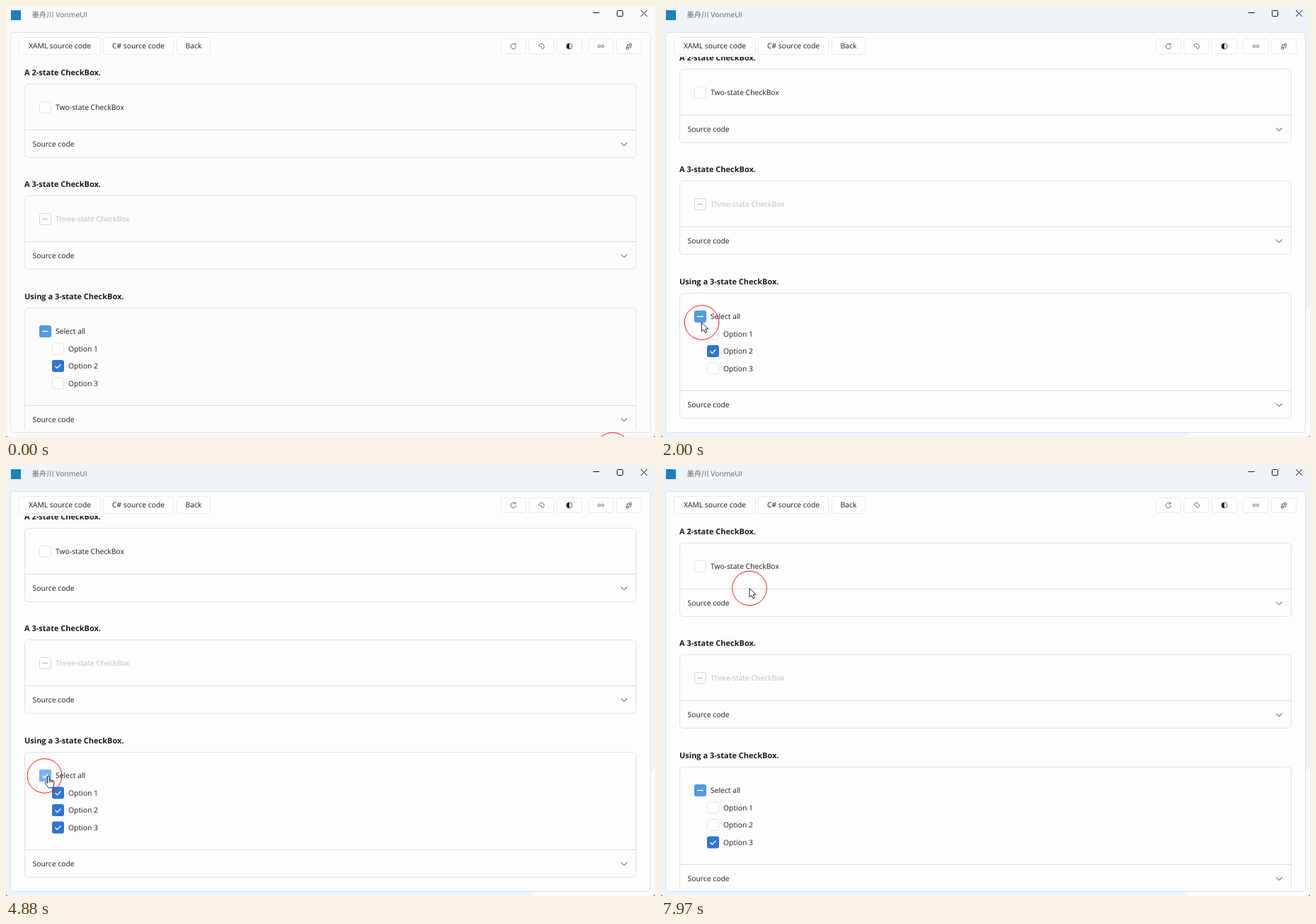
Write an HTML page that moves like this. It is 917 by 610 pixels and loops after 8000 ms.

```html
<!DOCTYPE html>
<html lang="zh">
<head>
<meta charset="utf-8">
<style>
html, body { margin: 0; width: 100%; height: 100%; overflow: hidden; background: #777; }
svg { display: block; }
text { font: 10.35px 'Open Sans', 'Noto Sans CJK SC', sans-serif; fill: #1c1c1c; text-rendering: geometricPrecision; }
.head { font-size: 11px; font-weight: 700; }
.line { fill: none; stroke: #333; }
.edge { stroke: #e1e1e1; }
.button { fill: #fefefe; stroke: #eaeaea; }
.icon .line { stroke: #555; stroke-width: .9; }
.mark { fill: none; stroke: #fff; stroke-width: 1.4; }
</style>
</head>
<body>
<svg id="stage" width="917" height="610" viewBox="0 0 917 610"></svg>
<script>
const LOOP = 8000, SCROLL = 21, HAND_SHIFT = 5;
const stage = document.getElementById('stage');
const boxes = {};

const text = (x, y, s, attrs = '') => `<text x="${x}" y="${y}" ${attrs}>${s}</text>`;
const rect = (x, y, w, h, r, attrs) =>
  `<rect x="${x}" y="${y}" width="${w}" height="${h}" rx="${r}" ${attrs}/>`;
const line = (d, attrs = '') => `<path class="line" d="${d}" ${attrs}/>`;

const button = (x, w, label) =>
  rect(x + .5, 44.5, w, 24, 3, 'class="button"') +
  text(x + .5 + w / 2, 60, label, 'text-anchor="middle"');

const iconButton = (x, icon) =>
  rect(x + .5, 46.5, 35, 21, 3, 'class="button"') +
  `<g class="icon" transform="translate(${x + 18} 57)">${icon}</g>`;

const cardTop = i => 110.5 + Math.round(158.4 * i);

function card(i, title, bodyHeight) {
  const top = cardTop(i), divider = top + bodyHeight;
  return text(26, top - 12.5, title, 'class="head"') +
    rect(26.5, top, 864, bodyHeight + 39, 5, 'class="edge" fill="none"') +
    line(`M27 ${divider}H890`, 'style="stroke:#dcdcdc"') +
    text(37.5, divider + 23.5, 'Source code') +
    line(`M869 ${divider + 18}l4.3 4.3 4.3-4.3`);
}

// Each box holds all its looks; setBox() shows the right ones.
function checkBox(id, x, y, label) {
  boxes[id] = { x, y };
  return `<g id="${id}">
    ${rect(x + .5, y - 8, 16, 16, 3, 'fill="#fefefe" stroke="#e3e3e3"')}
    ${rect(x, y - 8.5, 17, 17, 3, 'class="fill"')}
    ${rect(x, y - 8.5, 17, 17, 3, 'class="glow"')}
    <path class="mark dash" d="M${x + 4} ${y}h9"/>
    <path class="mark tick" d="M${x + 4.6} ${y + .2}l2.8 2.8 5-5.3"/>
  </g>${text(x + 23, y + 3.6, label)}`;
}

const icons = [
  line('M2.6-2.6A3.7 3.7 0 1 0 3.7 0M3-4.2V-2H.8'),
  line('M-3.8-1.2C-2.5-4.6 3.8-4.2 3.8.4C3.8 3.4 1.2 4.4.4 3C-.2 1.6 1 .8-.6.2C-2 0-3.4.4-3.8-1.2'),
  '<circle r="4" class="line"/><path d="M0-4A4 4 0 0 0 0 4z" fill="#222"/>',
  line('M-1 1.2A1.8 1.8 0 1 1-1-1.2M1-1.2A1.8 1.8 0 1 1 1 1.2M-1.8 0H1.8'),
  line('M.5-3.5h3v3h-3zM-3.5 1.5h3v2.5h-3zM.5-2h-3v3M3 .5v1.5h-3')
];

stage.innerHTML = `
<defs><clipPath id="view"><rect x="7" y="72" width="903" height="527"/></clipPath></defs>
${rect(0, -9, 917, 619, 4, 'id="window"')}
<path id="corner" d="M740 610L917 428V604Q917 610 911 610z" fill="#fbfcfd"/>
${rect(6.5, 37.5, 904, 566, 4, 'id="panel" stroke="#dfe1e4"')}
${rect(7, 6, 14, 14, 0, 'fill="#1b80c3"')}
${text(36.5, 16, '墨舟川 VonmeUI', 'style="fill:#666"')}
${line('M829.5 9.5h9M897 6l9 9M906 6l-9 9', 'style="stroke:#111"')}
${rect(863.5, 6.5, 8, 8, 1, 'class="line" style="stroke:#111"')}
${button(18, 115, 'XAML source code')}
${button(137, 99, 'C# source code')}
${button(241, 47, 'Back')}
${icons.map((icon, i) => iconButton(699 + 39.5 * i + (i > 2 ? 5 : 0), icon)).join('')}
<g clip-path="url(#view)"><g id="content">
  ${card(0, 'A 2-state CheckBox.', 65)}
  ${card(1, 'A 3-state CheckBox.', 65)}
  ${card(2, 'Using a 3-state CheckBox.', 138)}
  ${checkBox('two', 47, cardTop(0) + 33, 'Two-state CheckBox')}
  ${rect(47.5, 293.5, 16, 16, 3, 'fill="#fdfdfd" stroke="#d4d4d4"')}
  ${line('M51 301.5h8', 'style="stroke:#b4b4b4"')}
  ${text(70, 305, 'Three-state CheckBox', 'style="fill:#bdbdbd"')}
  ${checkBox('all', 47, cardTop(2) + 33, 'Select all')}
  ${[1, 2, 3].map(n => checkBox('opt' + n, 65, cardTop(2) + 33 + 24.5 * n, 'Option ' + n)).join('')}
</g></g>
<g id="pointer">
  <circle r="24.3" fill="none" stroke="#f11"/>
  <path id="arrow" d="M0 0V12.6L3 9.9 5.1 14.6 7.3 13.6 5.3 9H9.2z" fill="#fff" stroke="#111" stroke-width=".9"/>
  <path id="hand" d="M4 10.5V2Q4-.1 5.3-.1T6.6 2V6Q7.5 5 8.7 6.2Q10 5.4 11 6.7Q13.4 6.2 13.4 8.5V11.5Q13 14.5 11.6 16.8H5.4Q3.5 13.5.8 10.6Q.2 8.9 1.8 8.8Q3 9 4 10.5M6.6 6V9.4M8.8 6.2V9.4M11 6.8V9.6" fill="#fff" stroke="#111" stroke-width=".9"/>
</g>`;

// The pointer glides to x, y between two times and rests in between.
const entry = [857, 628];
const glides = [
  [50, 1100, 75, 440], [1220, 1275, 72.5, 448], [1300, 1640, 57.5, 448],
  [2050, 2200, 58.5, 442.5], [2960, 3420, 70.5, 456.5], [3660, 3820, 48.5, 440],
  [3970, 4500, 59.5, 440], [5140, 5340, 74, 456.5], [5540, 5750, 74, 483.5],
  [5900, 6340, 137.5, 296.5], [6420, 7110, 136.5, 138], [7210, 7410, 130.5, 146.5],
  [7860, 7940, 125, 174.5]
];
const clicks = [2460, 2760, 4000, 4780, 5490, 5900];

const find = id => document.getElementById(id);
const easeOut = k => 1 - (1 - Math.max(0, Math.min(1, k))) ** 3;
const show = (el, amount) => el.setAttribute('opacity', +amount);
const scrollAt = t => t >= 500 && t < 6500 ? SCROLL : 0;

const pointerAt = t => glides.reduce(([px, py], [from, to, x, y]) => {
  const k = easeOut((t - from) / (to - from));
  return [px + (x - px) * k, py + (y - py) * k];
}, entry);

function hoveredAt(t) {
  const [px, py] = pointerAt(t);
  return Object.keys(boxes).find(id => {
    const { x, y } = boxes[id];
    return px >= x && px < 170 && Math.abs(py + scrollAt(t) - y) < 8;
  });
}

// Hover fades in and out over the last 100 ms.
const glowAt = (id, t) =>
  [0, 20, 40, 60, 80, 100].filter(ago => hoveredAt(t - ago) === id).length / 6;

function optionsAt(t) {
  let options = [false, true, false];
  for (const time of clicks.filter(c => c <= t)) {
    const id = hoveredAt(time);
    if (id === 'all') options = options.fill(!options.includes(true));
    else options = options.map((on, i) => on !== (id === 'opt' + (i + 1)));
  }
  return options;
}

function setBox(id, state, t) {
  const part = name => find(id).querySelector('.' + name);
  const checked = state === 'checked', empty = state === 'empty';
  show(part('fill'), !empty);
  part('fill').setAttribute('fill', checked ? '#2f75d5' : '#5199e2');
  part('glow').setAttribute('fill', empty ? '#f1f1f1' : '#79b4ec');
  show(part('glow'), glowAt(id, t));
  show(part('tick'), checked);
  show(part('dash'), state === 'mixed');
}

function update(t) {
  const active = t >= 1450;
  find('window').setAttribute('fill', active ? '#eff4f9' : '#fafafa');
  find('panel').setAttribute('fill', active ? '#fdfdfd' : '#fcfcfc');
  show(find('corner'), active);
  find('content').setAttribute('transform', `translate(0 ${-scrollAt(t)})`);

  const options = optionsAt(t);
  const stateOf = on => on ? 'checked' : 'empty';
  setBox('two', 'empty', t);
  setBox('all', new Set(options).size > 1 ? 'mixed' : stateOf(options[0]), t);
  options.forEach((on, i) => setBox('opt' + (i + 1), stateOf(on), t));

  // The ring is anchored to the cursor picture, so it shifts with the hand.
  const hand = hoveredAt(t) !== undefined;
  const [x, y] = pointerAt(t);
  find('pointer').setAttribute('transform', `translate(${x - (hand ? HAND_SHIFT : 0)} ${y})`);
  show(find('arrow'), !hand);
  show(find('hand'), hand);
}

const start = performance.now();
function frame() {
  update((performance.now() - start) % LOOP);
  requestAnimationFrame(frame);
}
frame();
</script>
</body>
</html>
```
